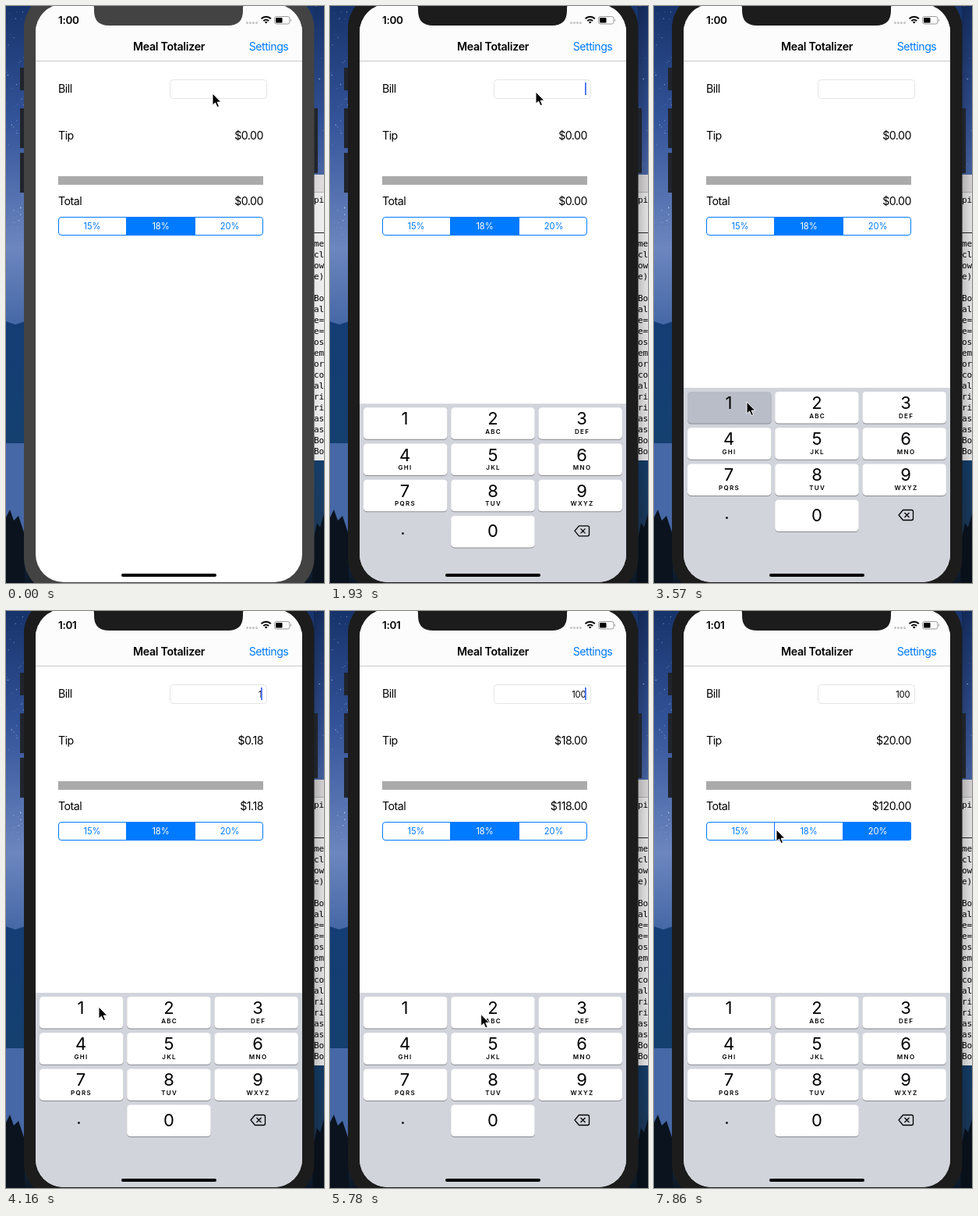
Animation of 408x739 px, one loop 8000 ms. Source, as an HTML page:

```html
<!DOCTYPE html>
<html lang="en">
<head>
<meta charset="utf-8">
<style>
  html, body { margin: 0; width: 100%; height: 100%; overflow: hidden; background: #123; }
  svg { display: block; width: 408px; height: 739px; font: 14.2px Inter, sans-serif; letter-spacing: -.5px; }
  .mid { text-anchor: middle; }
  .end { text-anchor: end; }
  .title { font-weight: 600; letter-spacing: -.3px; }
  .clock { font-size: 13.5px; font-weight: 600; letter-spacing: -.3px; }
  .small { font-size: 11.2px; letter-spacing: -.1px; }
  .digit { font-size: 22px; letter-spacing: 0; }
  .letters { font-size: 8px; font-weight: 600; letter-spacing: 1.3px; }
  .mono { font: 11px "DejaVu Sans Mono", monospace; letter-spacing: 0; }
</style>
</head>
<body>
<svg viewBox="0 0 408 739">
  <defs>
    <linearGradient id="sky" x2="0" y2="1">
      <stop offset="0" stop-color="#17336b"/>
      <stop offset=".2" stop-color="#34549a"/>
      <stop offset=".42" stop-color="#6c86bf"/>
      <stop offset=".55" stop-color="#4668a6"/>
    </linearGradient>
    <linearGradient id="hill" x2="0" y2="1">
      <stop offset="0" stop-color="#143d75"/>
      <stop offset=".5" stop-color="#14406f"/>
      <stop offset=".78" stop-color="#1c3c60"/>
      <stop offset="1" stop-color="#0c1725"/>
    </linearGradient>
    <linearGradient id="shade">
      <stop offset="0" stop-opacity=".22"/>
      <stop offset="1" stop-opacity=".08"/>
    </linearGradient>
    <clipPath id="screen"><rect x="38" y="-2.5" width="342" height="740.5" rx="36"/></clipPath>
  </defs>

  <rect width="408" height="739" fill="url(#sky)"/>
  <g id="stars" fill="#dfe8ff"></g>
  <path d="M0 404 L12 408 24 404 V739 H408 V560 H0Z" fill="url(#hill)"/>
  <path d="M0 655 l5 -10 5 14 6 -6 8 24 V739 H0Z M408 650 l-5 18 -4 -6 -6 30 V739 H408Z" fill="#0a131e"/>
  <rect x="390" y="216" width="18" height="366" fill="#f6f5f5"/>
  <rect x="390" y="216" width="18" height="22" fill="#e4e2e3"/>
  <path d="M390 238.5h18" stroke="#b9b7b8"/>
  <path d="M395 290.5h13" stroke="#222"/>
  <g id="log" class="mono"></g>
  <rect id="shadow" x="395" width="13" height="739" fill="url(#shade)"/>

  <path d="M18 79h6v29h-6z M18 131h6v51h-6z M18 188h6v51h-6z M394 131h6v83h-6z" fill="#20242b"/>
  <rect id="bezel" x="23" y="-17.5" width="372.5" height="770.5" rx="46"/>

  <g clip-path="url(#screen)">
    <rect x="38" y="-3" width="342" height="742" fill="#fff"/>
    <rect x="38" y="-3" width="342" height="73" fill="#fcfcfc"/>
    <path d="M38 70.5h342" stroke="#c9c9cb"/>
    <path id="notch" d="M107 -3 Q113 -3 113 3 V6 Q113 25 132 25 H285 Q304 25 304 6 V3 Q304 -3 310 -3Z"/>
    <text id="clock" class="clock" x="67" y="23"></text>
    <path d="M309.5 21.6h13" stroke="#c4c4c6" stroke-width="3" stroke-linecap="round" stroke-dasharray="0 4"/>
    <g fill="none" stroke="#000" stroke-width="2">
      <path d="M327.6 16.3a8.6 8.6 0 0 1 12.2 0"/>
      <path d="M330.3 19a5 5 0 0 1 6.8 0"/>
    </g>
    <path d="M331.8 20.6a2.8 2.8 0 0 1 3.8 0l-1.9 2z"/>
    <rect x="344.5" y="13.5" width="19.5" height="9.5" rx="2.6" fill="none" stroke="#999"/>
    <rect x="346" y="15" width="8.5" height="6.5" rx="1"/>
    <path d="M365.3 16.5q2 1.7 0 3.5z" fill="#999"/>

    <text class="title mid" x="209" y="57">Meal Totalizer</text>
    <text class="mid" x="337" y="57" fill="#007aff">Settings</text>
    <text x="67" y="111">Bill</text>
    <text x="67" y="171">Tip</text>
    <text x="67" y="255">Total</text>
    <text id="tip" class="end" x="330" y="171"></text>
    <text id="total" class="end" x="330" y="255"></text>
    <rect x="210.5" y="94.5" width="124" height="24" rx="4" fill="#fff" stroke="#e4e4e4"/>
    <text id="bill" class="small end" x="328.5" y="110.5"></text>
    <rect id="caret" x="327" y="98" width="1.8" height="16" fill="#426bf2"/>
    <rect x="67" y="218" width="263" height="11" fill="#aaa"/>
    <g id="segments"></g>
    <rect x="67.5" y="270.5" width="262" height="23" rx="3.5" fill="none" stroke="#007aff"/>
    <path d="M154.5 270v24M242.5 270v24" stroke="#007aff"/>

    <g id="keyboard">
      <rect x="38" y="489" width="342" height="260" fill="#d1d4db"/>
      <g id="keys"></g>
      <text class="digit mid" x="93.5" y="657">.</text>
      <path d="M319.5 645.5h11q2 0 2 2v9q0 2-2 2h-11l-5.500-6.500z M321.500 649l6 6m0-6l-6 6" fill="none" stroke="#000" stroke-width="1.300"/>
    </g>
    <rect x="148" y="727" width="122" height="4" rx="2"/>
  </g>

  <path id="cursor" d="M0 0V15.200L3.500 12 6 17.600 8.500 16.500 6.100 11.100H10.800Z" stroke="#fff"/>
</svg>

<script>
const $ = id => document.getElementById(id);
const LOOP = 8000, TICK = 148.5, LAG = 12;

// Cursor tip: [tick, x, y]
const path = [
  [0, 265, 112], [1, 265, 112], [2, 260, 112], [5, 260, 112], [6, 262, 110], [9, 264, 110],
  [13, 264, 110], [18, 166, 387], [19, 118, 521], [21, 118, 521], [23, 119, 507], [28, 119, 507],
  [29, 168, 575], [30, 225, 649], [37, 225, 649], [40, 178, 450], [42, 146, 322], [43, 156, 299],
  [44, 156, 299], [46, 158, 296], [48, 275, 286], [50, 275, 286], [52, 160, 281], [53, 157, 280]
];
const presses = [[24, 25, '1'], [32, 33, '0'], [35, 36, '0']];   // from, to, key
const caretSpans = [[1780, 2330], [2800, 3330], [3700, 5840], [6300, 6840], [7300, 7830]];
const rates = [15, 18, 20];
const edges = [67, 154.5, 242.5, 330];

const letters = ['', 'ABC', 'DEF', 'GHI', 'JKL', 'MNO', 'PQRS', 'TUV', 'WXYZ'];
const key = (digit, col, row, sub) => {
  const x = 43 + 112.2 * col, y = 494 + 46.2 * row, mid = [96, 209, 323][col];
  return `<rect x="${x}" y="${y + 1}" width="107.500" height="40.500" rx="4.500" fill="#898b90"/>
    <rect id="key${digit}" x="${x}" y="${y}" width="107.500" height="40.500" rx="4.500"/>
    <text class="digit mid" x="${mid}" y="${y + (sub === undefined ? 27.5 : 22)}">${digit}</text>
    <text class="letters mid" x="${mid + .6}" y="${y + 33.5}">${sub || ''}</text>`;
};
$('keys').innerHTML = letters.map((sub, i) => key(i + 1, i % 3, Math.floor(i / 3), sub)).join('') + key(0, 1, 3);

$('segments').innerHTML = rates.map((rate, i) =>
  `<rect id="seg${i}" x="${edges[i]}" y="270" width="${edges[i + 1] - edges[i]}" height="24" rx="${i === 1 ? 0 : 3}" fill="#007aff"/>
   <text id="rate${i}" class="small mid" x="${[110.5, 198.5, 287][i]}" y="286">${rate}%</text>`).join('');

$('log').innerHTML = 'pi,,,,me,cl,ow,e),,Bo,al,e=,e=,os,em,or,co,al,ri,ri,as,as,Bo,Bo'.split(',')
  .map((s, i) => `<text x="395" y="${252 + 14 * i}">${s}</text>`).join('');

let seed = 7;
const random = () => (seed = seed * 16807 % 2147483647) / 2147483647;
$('stars').innerHTML = Array.from({ length: 60 }, () =>
  `<circle cx="${(random() * 36 + 395) % 408}" cy="${random() * 300}" r="${.3 + random() * .5}" opacity="${.3 + random() * .5}"/>`).join('');

const clamp = v => Math.max(0, Math.min(1, v));

function cursorAt(tick) {
  const i = path.findIndex(p => p[0] > tick);
  if (i < 0) return path[path.length - 1].slice(1);
  const [t0, x0, y0] = path[i - 1], [t1, x1, y1] = path[i];
  const k = (tick - t0) / (t1 - t0);
  return [x0 + (x1 - x0) * k, y0 + (y1 - y0) * k];
}

function caretAlpha(time) {
  const span = caretSpans.find(([from, to]) => time >= from && time < to + 25);
  return span ? clamp((span[1] + 25 - time) / 60) : 0;
}

function draw(now) {
  const tick = Math.floor((now % LOOP + LAG) / TICK);
  const active = tick >= 6;
  for (const id of ['bezel', 'notch']) $(id).setAttribute('fill', active ? '#1c1c1c' : '#434343');
  $('shadow').setAttribute('opacity', active ? 1 : .3);
  $('clock').textContent = tick < 25 ? '1:00' : '1:01';

  const rise = clamp((tick - 11.3) / 3);
  $('keyboard').setAttribute('transform', `translate(0 ${250 * (1 - rise) ** 3})`);

  const pressed = presses.find(([from, to]) => tick >= from && tick < to);
  for (let d = 0; d < 10; d++) $('key' + d).setAttribute('fill', pressed && pressed[2] == d ? '#b8bdc7' : '#fff');

  const bill = presses.filter(p => tick >= p[1]).map(p => p[2]).join('');
  const selected = tick < 49 ? 1 : 2;
  const tip = bill * rates[selected] / 100;
  $('bill').textContent = bill;
  $('tip').textContent = '$' + tip.toFixed(2);
  $('total').textContent = '$' + (+bill + tip).toFixed(2);
  $('caret').setAttribute('opacity', caretAlpha(tick * TICK));

  rates.forEach((_, i) => {
    $('seg' + i).setAttribute('opacity', +(i === selected));
    $('rate' + i).setAttribute('fill', i === selected ? '#fff' : '#007aff');
  });
  $('cursor').setAttribute('transform', `translate(${cursorAt(tick)})`);
  requestAnimationFrame(draw);
}
requestAnimationFrame(draw);
</script>
</body>
</html>
```
